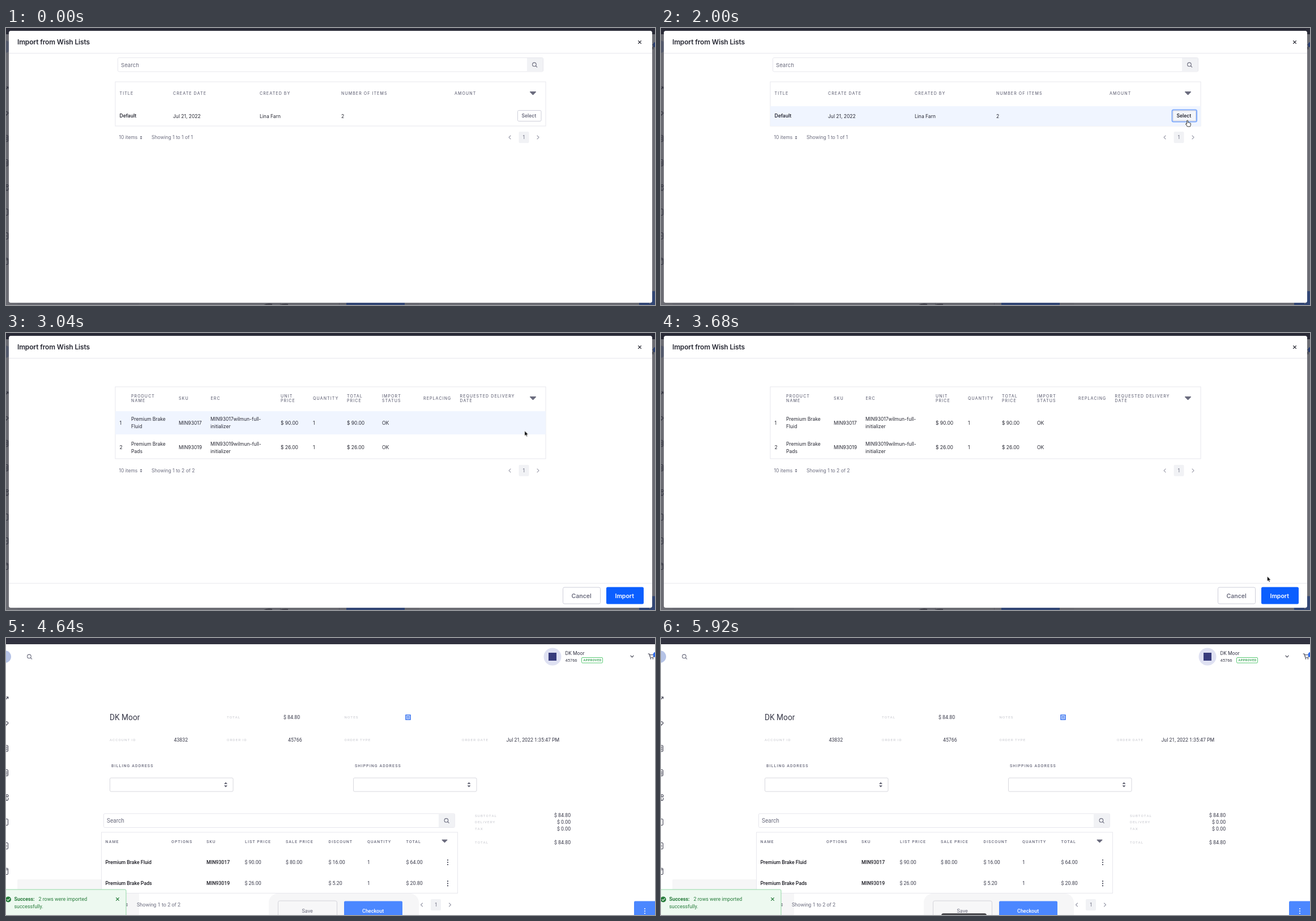
Recreate the animation shown at these times as an HTML page. Size 1146 by 489 pixels, loop 6.04 s.

```html
<!DOCTYPE html>
<html lang="en">
<head>
<meta charset="utf-8">
<title>Wish list import</title>
<style>
html, body { margin: 0; width: 100%; height: 100%; overflow: hidden; background: #fff; }
svg.stage { display: block; width: 100vw; height: 100vh; }
text { white-space: pre; }
.page { font: 8.75px Roboto, sans-serif; fill: #393a4a; }
.modal { font: 8.5px Inter, sans-serif; fill: #272833; }
.title { font-size: 12px; font-weight: 600; letter-spacing: -.14px; }
.head { font-size: 7px; font-weight: 500; letter-spacing: 1.1px; fill: #6b6c7e; }
.label { font-size: 6.25px; letter-spacing: 1.08px; fill: #c4c5cc; }
.bold { font-weight: 600; }
.medium { font-weight: 500; fill: #1c1c24; }
.muted { fill: #6b6c7e; }
.btn { font-size: 10.5px; font-weight: 600; }
.frame { fill: #fff; stroke: #e7e7ed; }
.soft { fill: #f1f2f5; }
.line { fill: none; stroke: #6b6c7e; stroke-width: 1.1; stroke-linecap: round; stroke-linejoin: round; }
.pale { stroke: #9c9dab; }
.dark { stroke: #393a4a; }
.hover { fill: #f0f5ff; }

/* one shared clock: 1% = 60.4 ms */
.anim { animation: 6040ms step-end infinite; }
.overlay { animation-name: overlay; animation-timing-function: linear; }
.list { animation-name: list; }
.preview { animation-name: preview; }
.hoverList { animation-name: hoverList; }
.hoverOne { animation-name: hoverOne; }
.hoverTwo { animation-name: hoverTwo; }
.focus { animation-name: focus; }
.mark { animation-name: mark; }
.near { animation-name: near; }
.far { animation-name: far; }
.toast { animation-name: toast; animation-timing-function: ease-out; }
.bar { animation-name: bar; animation-timing-function: ease-out; }
.cursor { animation-name: move; animation-timing-function: ease-in-out; }
.arrow { animation-name: arrow; }
.hand { animation-name: hand; }

@keyframes overlay { 0%, 73.6% { opacity: 1; } 76%, 100% { opacity: 0; } }
@keyframes list { 0% { opacity: 1; } 35.1%, 100% { opacity: 0; } }
@keyframes preview { 0% { opacity: 0; } 37.1% { opacity: 1; } 68.2%, 100% { opacity: 0; } }
@keyframes hoverList { 0% { opacity: 0; } 15.4% { opacity: 1; } 35.1%, 100% { opacity: 0; } }
@keyframes hoverOne { 0% { opacity: 0; } 37.1% { opacity: 1; } 51.1%, 100% { opacity: 0; } }
@keyframes hoverTwo { 0% { opacity: 0; } 51.1% { opacity: 1; } 52.8%, 100% { opacity: 0; } }
@keyframes focus { 0% { opacity: 0; } 29.14%, 100% { opacity: 1; } }
@keyframes mark { 0% { opacity: 1; } 68.2%, 100% { opacity: 0; } }
@keyframes near { 0% { transform: translateX(4px); } 74.2%, 100% { transform: none; } }
@keyframes far { 0% { transform: translateX(9px); } 74.2%, 100% { transform: none; } }
@keyframes toast { 0%, 74.8% { transform: translateY(50px); } 76.6%, 100% { transform: none; } }
@keyframes bar { 0%, 92% { transform: translateY(5px); } 93.4%, 100% { transform: none; } }
@keyframes move {
  0%, 7.2% { transform: translate(800px, 492px); }
  15.4% { transform: translate(947px, 174px); }
  17.2% { transform: translate(941px, 170px); }
  21.85%, 36.4% { transform: translate(930px, 163px); }
  38.7%, 40.4% { transform: translate(909px, 162px); }
  49.6% { transform: translate(914px, 170px); }
  60.9% { transform: translate(1070px, 429px); }
  65.5%, 73% { transform: translate(1079px, 458.5px); }
  75.5%, 100% { transform: translate(1086px, 495px); }
}
@keyframes arrow { 0% { opacity: 1; } 18.5% { opacity: 0; } 37.1% { opacity: 1; } 64.2% { opacity: 0; } 68.2%, 100% { opacity: 1; } }
@keyframes hand { 0% { opacity: 0; } 18.5% { opacity: 1; } 37.1% { opacity: 0; } 64.2% { opacity: 1; } 68.2%, 100% { opacity: 0; } }
</style>
</head>
<body>
<svg class="stage" viewBox="0 0 1146 489" preserveAspectRatio="none">
  <defs>
    <g id="lens" class="line"><circle cx="-.6" cy="-.6" r="3.3"/><path d="M1.9 1.9 4.2 4.2"/></g>
    <path id="sort" d="M-5-3H5Q6-2.6 5.2-1.7L.7 2.9Q0 3.4-.7 2.9L-5.2-1.7Q-6-2.6-5-3z" fill="#6b6c7e"/>
    <path id="updown" d="M-3-1.2 0-4.6 3-1.2zM-3 1.2 0 4.6 3 1.2z" fill="#5c5d6e"/>
    <g id="kebab"><circle cy="-4" r="1.1"/><circle r="1.1"/><circle cy="4" r="1.1"/></g>
    <path id="cross" d="M-2.4-2.4 2.4 2.4M2.4-2.4-2.4 2.4" fill="none" stroke-width="1.3" stroke-linecap="round"/>
    <g id="steps">
      <rect class="soft" x="-9" y="-10" width="18" height="20" rx="2"/>
      <text class="muted" x="-2" y="3.1">1</text>
      <path class="line pale" d="M-23.5-3-26.5 0-23.5 3M23.5-3 26.5 0 23.5 3"/>
    </g>
    <rect id="sheet" class="soft" x="0" y="-5.5" width="4.5" height="11" rx="1.5" style="fill:none;stroke:#393a4a"/>
  </defs>

  <g class="page">
    <rect width="1146" height="489" fill="#fff"/>
    <rect width="1146" height="11" fill="#30313f"/>
    <circle cx="-2" cy="33" r="11" fill="#b5c3e6"/>
    <use href="#lens" x="41.5" y="33"/>
    <circle cx="965" cy="33" r="15.5" fill="#dfe1f2"/>
    <rect x="958" y="26" width="14" height="14" fill="#383c7c"/>
    <text x="987.5" y="30">DK Moor</text>
    <text x="987.5" y="42" font-size="7.5">45766</text>
    <rect x="1016.5" y="34.5" width="37" height="9.5" rx="1.5" fill="#fff" stroke="#5aca75"/>
    <text x="1019.5" y="41.3" font-size="5.6" font-weight="700" letter-spacing=".4" style="fill:#3fa65a">APPROVED</text>
    <path class="line dark" d="M1103 31.2l2.5 2.6 2.5-2.6M1134 28h2l1.6 6.2h5.4l1.3-4.4h-7.2"/>
    <circle cx="1138.4" cy="36.5" r="1"/><circle cx="1142.4" cy="36.5" r="1"/>
    <circle cx="1147.5" cy="29.5" r="5" fill="#2f6df0"/>

    <path class="line dark" d="M-1 109 3.5 104.5M1 104h2.8v3M-1 148q4-1 5 2.500-1 1.500-2 1.500M2 151.500q0 2.500-3 2.500"/>
    <use href="#sheet" x="-1" y="195"/><use href="#sheet" x="-1" y="238"/>
    <path class="line dark" d="M0 192.500h2M0 195h2M0 197.500h2M0 236h2M0 238.500h2M0 241h2M0 282v3q0 2 2 2 2-.5 2-4.500"/>
    <circle class="line dark" cx="2" cy="278.500" r="2"/>
    <use href="#sheet" x="-1" y="325"/><use href="#sheet" x="-1" y="367"/><use href="#sheet" x="-1" y="412"/>
    <path class="line dark" d="M0 367h1.500M-1 409h4.500"/>

    <text x="183" y="144.500" font-size="13.75">DK Moor</text>
    <g class="label">
      <text x="390" y="142.400">TOTAL</text><text x="597.500" y="142.400">NOTES</text>
      <text x="183" y="181.800">ACCOUNT ID</text><text x="390" y="181.800">ORDER ID</text>
      <text x="597.500" y="181.800">ORDER TYPE</text><text x="805" y="181.800">ORDER DATE</text>
      <text x="828" y="315.500">SUBTOTAL</text><text x="828" y="327.300">DELIVERY</text>
      <text x="828" y="339">TAX</text><text x="828" y="363.300">TOTAL</text>
    </g>
    <text x="490" y="143.200">$ 84.80</text>
    <rect x="706" y="136" width="8" height="8" fill="#fff" stroke="#2f6df0" stroke-width="1.5"/>
    <path d="M707.500 138.500h5M707.500 140h5M707.500 141.700h5" stroke="#2f6df0"/>
    <text x="296.500" y="182.500">43832</text><text x="498" y="182.500">45766</text>
    <text x="883.500" y="182.500">Jul 21, 2022 1:35:47 PM</text>
    <text x="968" y="316.300">$ 84.80</text><text x="973" y="328">$ 0.00</text>
    <text x="973" y="339.800">$ 0.00</text><text x="968" y="364">$ 84.80</text>
    <text class="head" x="186" y="228.300">BILLING ADDRESS</text>
    <text class="head" x="616" y="228.300">SHIPPING ADDRESS</text>
    <g fill="#fff" stroke="#d8d8de">
      <rect x="183.500" y="247" width="217.500" height="24" rx="2"/>
      <rect x="613.500" y="247" width="217.500" height="24" rx="2"/>
    </g>
    <use href="#updown" x="388" y="259"/><use href="#updown" x="817.500" y="259"/>

    <rect x="20" y="426" width="215" height="63" rx="2" fill="#f6f6f7"/>
    <rect x="464" y="451" width="265" height="60" rx="16" fill="#f6f6f7"/>
    <rect class="frame" x="172.500" y="310" width="620" height="24.500" rx="2"/>
    <rect class="soft" x="764" y="310.500" width="28.500" height="23.500"/>
    <text class="muted" x="178" y="325.800" font-size="10">Search</text>
    <use href="#lens" x="778" y="322.500"/>
    <rect class="frame" x="168.500" y="343" width="629" height="107.500"/>
    <g class="head">
      <text x="175.500" y="362">NAME</text><text x="292" y="362">OPTIONS</text><text x="354" y="362">SKU</text>
      <text x="422" y="362">LIST PRICE</text><text x="494" y="362">SALE PRICE</text><text x="569.500" y="362">DISCOUNT</text>
      <text x="638" y="362">QUANTITY</text><text x="706.500" y="362">TOTAL</text>
    </g>
    <use href="#sort" x="774.500" y="358.500" transform="translate(77.45 35.85) scale(.9)"/>
    <g class="medium">
      <text x="175.500" y="399">Premium Brake Fluid</text><text x="354" y="399">MIN93017</text>
      <text x="175.500" y="436.300">Premium Brake Pads</text><text x="354" y="436.300">MIN93019</text>
    </g>
    <text x="421.500" y="399">$ 90.00</text><text x="494" y="399">$ 80.00</text><text x="569.500" y="399">$ 16.00</text>
    <text x="638" y="399">1</text><text x="706.500" y="399">$ 64.00</text>
    <text x="421.500" y="436.300">$ 26.00</text><text x="569.500" y="436.300">$ 5.20</text>
    <text x="638" y="436.300">1</text><text x="706.500" y="436.300">$ 20.80</text>
    <use href="#kebab" x="780" y="396"/><use href="#kebab" x="780" y="433.300"/>
    <use href="#updown" transform="translate(213.500 471) scale(.6)"/>
    <text class="muted" x="231" y="474.200" font-size="9">Showing 1 to 2 of 2</text>
    <use href="#steps" x="759" y="471"/>

    <g class="anim near">
      <rect x="480.500" y="464" width="104" height="40" rx="3" fill="#f7f7f8" stroke="#d4d4da"/>
      <text class="muted" x="522.500" y="485" font-size="9">Save</text>
      <rect x="597" y="464.500" width="103" height="40" rx="2" fill="#4b87ff"/>
      <text x="629" y="485" font-size="9" font-weight="500" style="fill:#fff">Checkout</text>
    </g>
    <g class="anim far">
      <rect x="1109" y="464.500" width="60" height="40" rx="2" fill="#4b87ff"/>
      <use href="#kebab" x="1128" y="482" fill="#fff"/>
    </g>

    <g class="anim toast" style="fill:#287d3c">
      <rect x="-5" y="444" width="217" height="60" rx="2" fill="#edf9f0" stroke="#93d8a6"/>
      <circle cx="4" cy="461.500" r="5"/>
      <path d="M1.500 461.500l2 2 3.500-3.800" fill="none" stroke="#edf9f0" stroke-width="1.200"/>
      <text x="14.500" y="464.300" font-size="8.900" font-weight="700">Success:</text>
      <text x="57.500" y="464.300" font-size="8.900">2 rows were imported</text>
      <text x="14.500" y="477.300" font-size="8.900">successfully.</text>
      <use href="#cross" x="197" y="461" stroke="#287d3c"/>
    </g>
    <rect class="anim bar" x="495" y="486" width="80" height="12" rx="4" fill="#4a4a4e"/>
  </g>

  <g class="modal anim overlay">
    <rect width="1146" height="489" fill="#272833" fill-opacity=".68"/>
    <g fill="#45454e">
      <path class="anim mark" d="M455 489q6-4 15-2v2z"/>
      <path d="M483 489q6-3 15-2v2z"/>
    </g>
    <rect x="5" y="5" width="1136" height="480" rx="3.500" fill="#fff"/>
    <text class="title" x="20" y="29.300">Import from Wish Lists</text>
    <use href="#cross" x="1119" y="25" stroke="#272833"/>
    <rect x="5" y="44" width="1136" height="1" fill="#e7e7ed"/>

    <g class="anim list">
      <rect class="frame" x="197.500" y="52.500" width="751" height="24.500" rx="2"/>
      <rect class="soft" x="920" y="53" width="28" height="23.500"/>
      <text class="muted" x="203" y="68.500" font-size="9.600">Search</text>
      <use href="#lens" x="933.500" y="65"/>
      <rect class="frame" x="193" y="95" width="760" height="78"/>
      <rect class="hover anim hoverList" x="193" y="138" width="760" height="35"/>
      <g class="head">
        <text x="200.500" y="117.500">TITLE</text><text x="295" y="117.500">CREATE DATE</text>
        <text x="448" y="117.500">CREATED BY</text><text x="592" y="117.500">NUMBER OF ITEMS</text>
        <text x="792" y="117.500">AMOUNT</text>
      </g>
      <use href="#sort" x="930.500" y="115"/>
      <text class="bold" x="200.500" y="158">Default</text>
      <text x="295" y="158.500">Jul 21, 2022</text><text x="448" y="158.500">Lina Farn</text><text x="592" y="158.500">2</text>
      <rect x="903.500" y="145.500" width="41.500" height="19" rx="2" fill="#fff" stroke="#cdced9"/>
      <text class="bold muted" x="910.500" y="158">Select</text>
      <g class="anim focus">
        <rect x="902.500" y="144.500" width="43.500" height="21" rx="2.500" fill="#f7f8f9" stroke="#80acff" stroke-width="2"/>
        <rect x="904" y="146" width="40.500" height="18" rx="1.500" fill="#f3f5fa" stroke="#cdced9"/>
        <text class="bold" x="910.500" y="158">Select</text>
      </g>
      <text class="muted" x="199.500" y="196">10 items</text>
      <use href="#updown" transform="translate(238.500 193.500) scale(.65)"/>
      <text class="muted" x="257" y="196">Showing 1 to 1 of 1</text>
      <use href="#steps" x="914.500" y="193"/>
    </g>

    <g class="anim preview">
      <rect class="frame" x="193" y="95" width="760" height="127"/>
      <rect class="hover anim hoverOne" x="193" y="138" width="760" height="41"/>
      <rect class="hover anim hoverTwo" x="193" y="180" width="760" height="42"/>
      <g class="head">
        <text x="221" y="114">PRODUCT</text><text x="221" y="121.500">NAME</text>
        <text x="305" y="117.500">SKU</text><text x="361.500" y="117.500">ERC</text>
        <text x="485" y="114">UNIT</text><text x="485" y="121.500">PRICE</text>
        <text x="542" y="117.500">QUANTITY</text>
        <text x="602" y="114">TOTAL</text><text x="602" y="121.500">PRICE</text>
        <text x="664" y="114">IMPORT</text><text x="664" y="121.500">STATUS</text>
        <text x="737" y="117.500">REPLACING</text>
        <text x="801.500" y="114">REQUESTED DELIVERY</text><text x="801.500" y="121.500">DATE</text>
      </g>
      <use href="#sort" x="930.500" y="115"/>
      <text x="200.500" y="162">1</text>
      <text x="221" y="155.200">Premium Brake</text><text x="221" y="168.200">Fluid</text>
      <text x="305" y="162">MIN93017</text>
      <text x="361" y="155.200">MIN93017wilmun-full-</text><text x="361" y="168.200">initializer</text>
      <text x="485" y="162">$ 90.00</text><text x="542" y="162">1</text>
      <text x="602" y="162">$ 90.00</text><text x="664" y="162">OK</text>
      <text x="200.500" y="205.300">2</text>
      <text x="221" y="198.700">Premium Brake</text><text x="221" y="211.700">Pads</text>
      <text x="305" y="205.300">MIN93019</text>
      <text x="361" y="198.700">MIN93019wilmun-full-</text><text x="361" y="211.700">initializer</text>
      <text x="485" y="205.300">$ 26.00</text><text x="542" y="205.300">1</text>
      <text x="602" y="205.300">$ 26.00</text><text x="664" y="205.300">OK</text>
      <text class="muted" x="199.500" y="246">10 items</text>
      <use href="#updown" transform="translate(238.500 243) scale(.65)"/>
      <text class="muted" x="257" y="246">Showing 1 to 2 of 2</text>
      <use href="#steps" x="914.500" y="242.800"/>
      <rect x="5" y="441.500" width="1136" height="1" fill="#e7e7ed"/>
      <rect x="983.500" y="449" width="66" height="29" rx="2.500" fill="#fff" stroke="#cdced9"/>
      <text class="btn muted" x="998.500" y="467.600">Cancel</text>
      <rect x="1060" y="448.500" width="66" height="30" rx="2.500" fill="#0b5fff"/>
      <text class="btn" x="1075.500" y="467.600" style="fill:#fff">Import</text>
    </g>
  </g>

  <g class="anim cursor" stroke-linejoin="round">
    <path class="anim arrow" d="M.5.500V9.300L2.500 7.600 3.900 10.700 5.300 10.100 4 7.100H6.600z" fill="#000" stroke="#fff" stroke-width=".6"/>
    <path class="anim hand" d="M-1.500 1Q-1.500 0-.5 0T.5 1V4Q1.500 3.300 2.300 4.300 3.300 3.800 4 4.800 5.300 4.600 5.300 6V8Q5 9.500 4.400 11H-.6Q-1.500 9-3.300 7 -3.800 5.600-2.600 5.700L-1.500 6.600z" fill="#fff" stroke="#222" stroke-width=".9"/>
  </g>
</svg>
</body>
</html>
```
